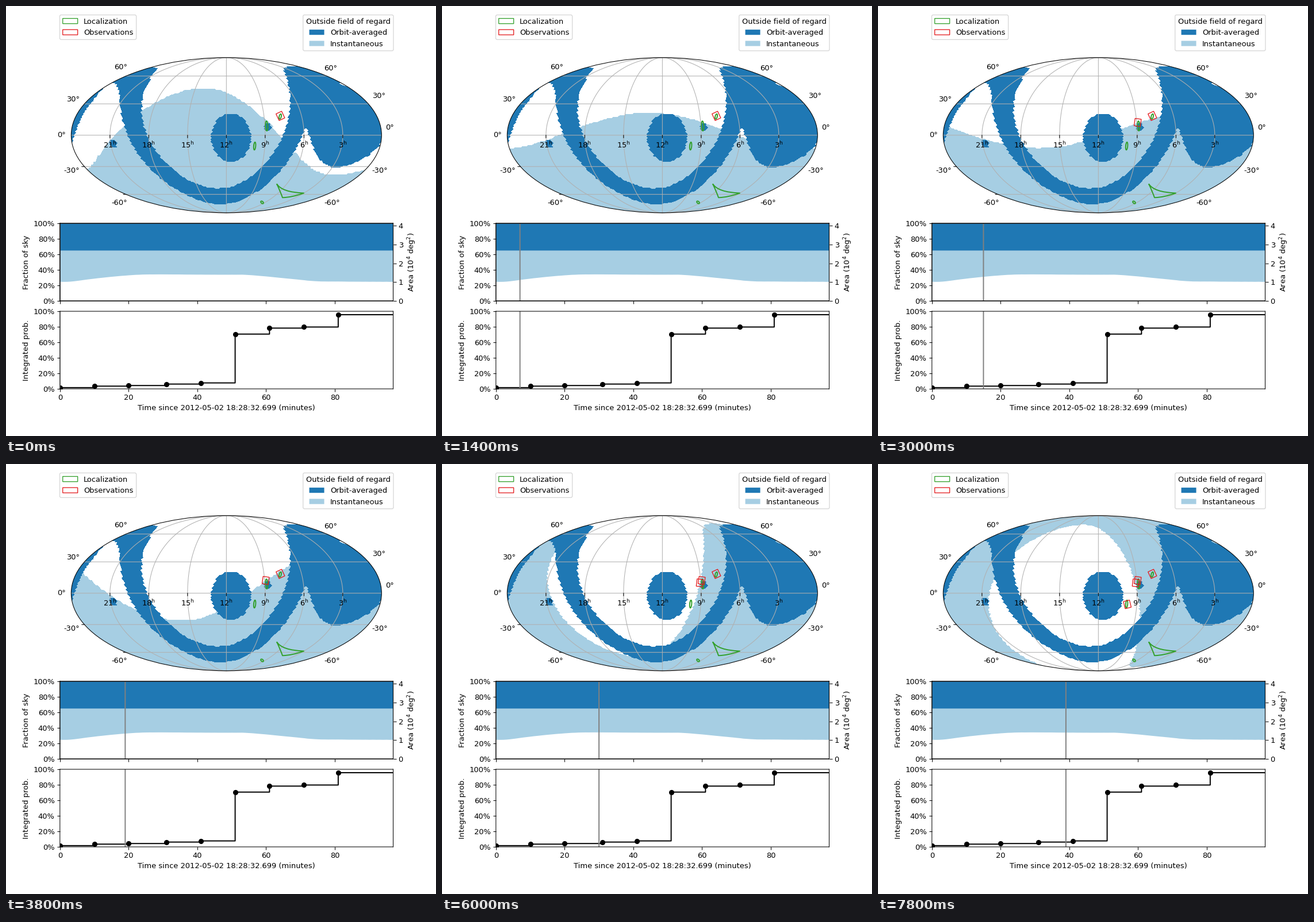
Recreate the animation shown at these times as a matplotlib script. Size 748 by 748 pixels, loop 8000 ms.

```python
import numpy as np
import matplotlib.pyplot as plt
from matplotlib.animation import FuncAnimation
from matplotlib.patches import Ellipse, Patch, PathPatch, Rectangle
from matplotlib.path import Path
from matplotlib.ticker import MultipleLocator, PercentFormatter

plt.rcParams.update({"font.family": "DejaVu Sans", "path.snap": False})

LIGHT, DARK, GREEN, RED = "#a6cee3", "#1f78b4", "#33a02c", "#e31a1c"
MINUTES, SPAN, PERIOD = 40, 97, 96.7
INCLINATION, NODE, START_ANGLE, LIMB = 97.8, 42.0, 48.3, 94.07
NSIDE = 32


def unit(ra, dec):
    """Unit vector for angles in degrees."""
    ra, dec = np.radians(ra), np.radians(dec)
    return np.array([np.cos(dec) * np.cos(ra), np.cos(dec) * np.sin(ra), np.sin(dec)])


def cosd(deg):
    return np.cos(np.radians(deg))


# Equal-area sky cells, laid out in rings (HEALPix)
ring = np.arange(1, 4 * NSIDE)
from_pole = np.minimum(ring, 4 * NSIDE - ring)
count = 4 * np.minimum(from_pole, NSIDE)
cap_z = np.sign(2 * NSIDE - ring) * (1 - from_pole**2 / (3 * NSIDE**2))
ring_z = np.where(from_pole < NSIDE, cap_z, 4 / 3 - 2 * ring / (3 * NSIDE))
offset = np.where((from_pole < NSIDE) | ((ring - NSIDE) % 2 == 0), 0.5, 0)
first = np.cumsum(count) - count

owner = np.repeat(np.arange(len(ring)), count)
cell_phi = 2 * np.pi * (np.arange(count.sum()) - first[owner] + offset[owner]) / count[owner]
cell_z = ring_z[owner]
cell_r = np.sqrt(1 - cell_z**2)
cells = np.stack([cell_r * np.cos(cell_phi), cell_r * np.sin(cell_phi), cell_z], -1)


def stencil(phi, z):
    """Four neighbouring cells and their bilinear weights for each position."""
    polar, rings = np.arccos(z), np.arccos(ring_z)
    upper = np.clip(np.searchsorted(rings, polar) - 1, 0, len(rings) - 2)
    down = np.clip((polar - rings[upper]) / (rings[upper + 1] - rings[upper]), 0, 1)
    index, weight = [], []
    for r, w in ((upper, 1 - down), (upper + 1, down)):
        place = phi / (2 * np.pi) * count[r] - offset[r]
        left = np.floor(place).astype(int)
        part = place - left
        index += [first[r] + left % count[r], first[r] + (left + 1) % count[r]]
        weight += [w * (1 - part), w * part]
    return np.array(index), np.array(weight)


# Mollweide raster, right ascension growing to the left
gx, gy = np.meshgrid((np.arange(540) + 0.5) / 135 - 2, 1 - (np.arange(270) + 0.5) / 135)
theta = np.arcsin(gy)
lon = np.clip(np.pi * gx / (2 * np.cos(theta)), -np.pi, np.pi)
near, share = stencil(np.pi - lon, (2 * theta + np.sin(2 * theta)) / np.pi)


def on_map(mask):
    return (mask[near] * share).sum(0) > 0.5


# Sun, Moon, Milky Way and orbit poles are never in view
pole = unit(NODE - 90, 90 - INCLINATION)
node = unit(NODE, 0)
ahead = np.cross(pole, node)
blocked = (
    (cells @ unit(40.1, 15.55) > cosd(46))
    | (cells @ unit(174.3, -2.3) > cosd(23))
    | (np.abs(cells @ unit(192.86, 27.13)) < cosd(80))
    | (np.abs(cells @ pole) > cosd(LIMB - 90))
)
blocked_map = on_map(blocked)


def hidden(t):
    """Cells outside the field of regard at minute t."""
    u = np.radians(START_ANGLE + 360 * t / PERIOD)
    earth = -(np.cos(u) * node + np.sin(u) * ahead)
    return blocked | (cells @ earth > cosd(LIMB))


PALETTE = np.array([[255, 255, 255], [166, 206, 227], [31, 120, 180]], np.uint8)


def sky_image(t):
    return PALETTE[np.where(blocked_map, 2, on_map(hidden(t)).astype(int))]


fig = plt.figure(figsize=(8, 8), dpi=93.5, facecolor="white")
grid = fig.add_gridspec(3, 1, height_ratios=[2, 1, 1], hspace=0.1)
ax_map = fig.add_subplot(grid[0])
ax_frac = fig.add_subplot(grid[1])
ax_prob = fig.add_subplot(grid[2], sharex=ax_frac)

# Map
PX = 1 / 135
ax_map.set(xlim=(-2, 2), ylim=(-1, 1))
ax_map.axis("off")
image = ax_map.imshow(sky_image(0), extent=(-2, 2, -1, 1), interpolation="bilinear", aspect="equal")
rim = Ellipse((0, 0), 4, 2, fill=False, ec="black", lw=0.8, zorder=4, clip_on=False)
ax_map.add_patch(rim)
image.set_clip_path(rim)


def at(x, y):
    """Stage pixels to map units."""
    return (x - 383.35) * PX, (224.76 - y) * PX


def parallel(dec):
    """Auxiliary Mollweide angle by Newton steps."""
    goal, a = np.pi * np.sin(np.radians(dec)), np.radians(dec) * 0.8
    for _ in range(20):
        a -= (2 * a + np.sin(2 * a) - goal) / (2 + 2 * np.cos(2 * a))
    return a


def segment(xs, ys, color="#b0b0b0", z=2):
    ax_map.plot(xs, ys, color=color, lw=0.8, zorder=z, clip_on=False)


arc = np.linspace(-np.pi / 2, np.pi / 2, 121)
for hour in range(3, 24, 3):
    x = 2 - hour / 6
    segment(x * np.cos(arc), np.sin(arc))
    segment([x, x], [0, -4.5 * PX], "black", 3)
    ax_map.text(x, -22.2 * PX, rf"${hour}^\mathrm{{h}}$", ha="center", va="baseline", zorder=6)

for dec in range(-60, 61, 30):
    a = parallel(dec)
    w, y = 2 * np.cos(a), np.sin(a)
    segment([-w, w], [y, y])
    if dec < 0:
        segment([-w - 4.5 * PX, -w], [y, y], "black", 3)
    gap = (9 - 11.5 * (dec / 60) ** 4) * PX
    rise = dec / 4 * PX
    ax_map.text(-w - gap, y + rise, f"{dec}°", ha="right", va="center")
    ax_map.text(w + gap - 2 * PX, y + (13.5 * PX if dec >= 0 else rise), f"{dec}°", ha="left", va="center")

# Localization contours
outline = dict(fill=False, ec=GREEN, lw=1.5, zorder=3)
for x, y, w, h, tilt in [
    (477, 192.3, 3.6, 9, -14), (453.4, 208.7, 4, 17, 3), (432.6, 243.6, 3.4, 13.5, -5), (445.5, 341.6, 5.5, 3.4, -40),
]:
    ax_map.add_patch(Ellipse(at(x, y), w * PX, h * PX, angle=tilt, **outline))
bends = [(471, 309.5), (480, 324), (518, 325.5), (497, 333), (481, 333.3), (477, 322), (471, 309.5)]
crescent = Path([at(*p) for p in bends], [Path.MOVETO] + [Path.CURVE3] * 6)
ax_map.add_patch(PathPatch(crescent, joinstyle="round", **outline))

# Observations: start minutes, total probability after each, first footprints
starts = [10 * i + (i > 2) for i in range(9)]
probs = [0.016, 0.035, 0.043, 0.062, 0.077, 0.706, 0.783, 0.797, 0.956]
footprints = []
for x, y, tilt in [(477.3, 191.2, 25), (451.7, 202.6, -8), (448.4, 206.8, -7), (433.7, 244.2, 14)]:
    w, h = 10.8 * PX, 12.8 * PX
    cx, cy = at(x, y)
    box = Rectangle((cx - w / 2, cy - h / 2), w, h, angle=tilt, rotation_point="center",
                    fill=False, ec=RED, lw=1, zorder=3.5)
    footprints.append(ax_map.add_patch(box))

# Legends
TOP = 1 - 15.5 / 748
fig.legend(
    handles=[Patch(fc="none", ec=GREEN, label="Localization"), Patch(fc="none", ec=RED, label="Observations")],
    loc="upper left", bbox_to_anchor=(0.125, TOP), borderaxespad=0)
fig.legend(
    handles=[Patch(color=DARK, lw=0, label="Orbit-averaged"), Patch(color=LIGHT, lw=0, label="Instantaneous")],
    title="Outside field of regard", loc="upper right", bbox_to_anchor=(0.901, TOP), borderaxespad=0)

# Sky fraction over one orbit
times = np.arange(SPAN + 1)
visible = [1 - hidden(t).mean() for t in times]
free = 1 - blocked.mean()
ax_frac.fill_between(times, visible, free, color=LIGHT, lw=0)
ax_frac.fill_between(times, free, 1, color=DARK, lw=0)
ax_frac.set(xlim=(0, SPAN), ylim=(0, 1), ylabel="Fraction of sky")
ax_frac.tick_params(labelbottom=False)
ax_area = ax_frac.twinx()
ax_area.set(ylim=(0, 4.1253), ylabel="Area (10$^4$ deg$^2$)")
ax_area.yaxis.set_major_locator(MultipleLocator(1))

# Integrated probability
ax_prob.step(starts + [SPAN], probs + probs[-1:], where="post", color="black")
ax_prob.plot(starts, probs, "o", color="black")
ax_prob.set(ylim=(0, 1), ylabel="Integrated prob.",
            xlabel="Time since 2012-05-02 18:28:32.699 (minutes)")

cursors = []
for ax in (ax_frac, ax_prob):
    ax.xaxis.set_major_locator(MultipleLocator(20))
    ax.yaxis.set_major_locator(MultipleLocator(0.2))
    ax.yaxis.set_major_formatter(PercentFormatter(1, decimals=0))
    ax.set_position(ax.get_position().translated(0.3 / 748, -0.3 / 748))
    cursors.append(ax.axvline(0, color="gray"))


def update(minute):
    image.set_data(sky_image(minute))
    for start, box in zip(starts, footprints):
        box.set_visible(minute >= start)
    for line in cursors:
        line.set_xdata([minute, minute])
    return [image, *cursors, *footprints]


anim = FuncAnimation(fig, update, frames=MINUTES, interval=200, init_func=lambda: update(0), repeat=True)
plt.show()
```
